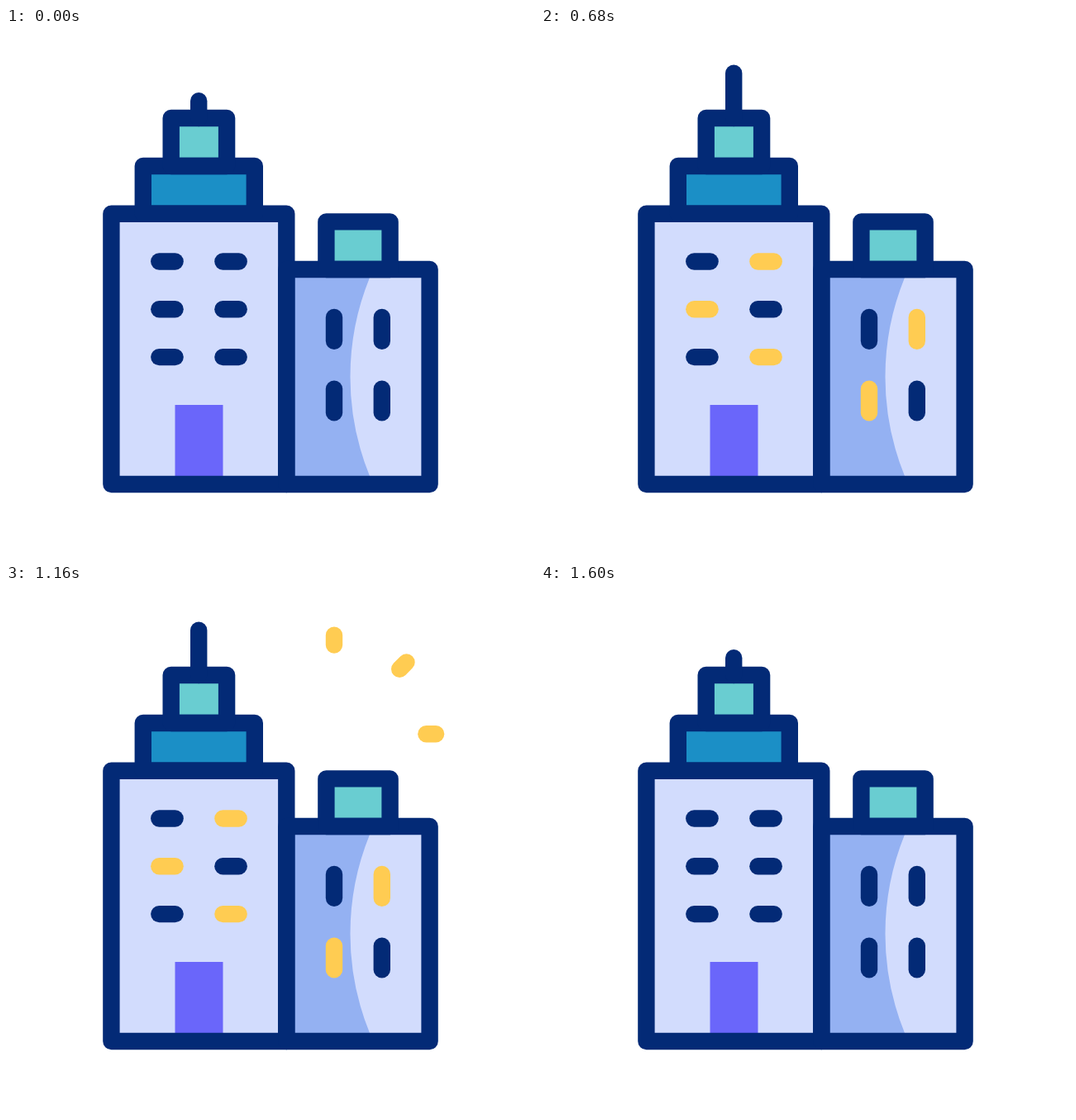
Animation of 640x640 px, one loop 1640 ms. Source, as an HTML page:

```html
<!DOCTYPE html>
<html lang="en">
<head>
<meta charset="utf-8">
<title>City buildings</title>
<style>
  html, body { margin: 0; width: 100%; height: 100%; overflow: hidden; background: #fff; }
  svg { display: block; width: 100%; height: 100%; }
  .line { fill: none; stroke: #032a76; stroke-width: 20.4; stroke-linecap: round; stroke-linejoin: round; }
  .spark { stroke: #ffcc52; }
</style>
</head>
<body>
<svg viewBox="0 0 640 640">
  <rect x="127" y="225" width="212" height="327" fill="#d2dcfd"/>
  <rect x="339" y="292" width="174" height="260" fill="#d2dcfd"/>
  <path d="M339 302H440A318 318 0 0 0 440 542H339Z" fill="#94b1f2"/>
  <rect x="204.5" y="456" width="58" height="90" fill="#6a66fa"/>
  <rect x="387" y="234" width="78" height="58" fill="#69cdd1"/>
  <rect x="200" y="109" width="67" height="58" fill="#69cdd1"/>
  <rect x="166" y="167" width="135" height="58" fill="#1b8fc6"/>
  <g class="line">
    <path d="M127.4 224.8H339.3V552H127.4Z"/>
    <path d="M339.3 292H512.6V552H339.3Z"/>
    <path d="M387.4 292V234.4H464.6V292Z"/>
    <path d="M165.8 224.8V167H300.8V224.8Z"/>
    <path d="M199.7 167V109H267.1V167Z"/>
    <path id="mast"/>
  </g>
  <g id="windows"></g>
  <g id="sparks"></g>
</svg>
<script>
const LOOP = 1640;
const NAVY = '#032a76', YELLOW = '#ffcc52';
const TRAVEL = 333;
const MAST_UP = 338, MAST_DOWN = 1257;
const LIGHTS_ON = 580, LIGHTS_OFF = 1500;
const HEAD_START = 753, TAIL_START = 918;

const byId = id => document.getElementById(id);

function addLine(parent, cls, d = '') {
  const p = document.createElementNS('http://www.w3.org/2000/svg', 'path');
  p.setAttribute('class', cls);
  p.setAttribute('d', d);
  parent.appendChild(p);
  return p;
}

// Windows that light up form a checker pattern.
const lit = [];
function addWindow(row, col, d) {
  const p = addLine(byId('windows'), 'line', d);
  if ((row + col) % 2) lit.push(p);
}
for (let row = 0; row < 3; row++)
  for (let col = 0; col < 2; col++)
    addWindow(row, col, `M${185.3 + col * 77.1} ${282.5 + row * 57.8}h19.3`);
for (let row = 0; row < 2; row++)
  for (let col = 0; col < 2; col++)
    addWindow(row, col, `M${397 + col * 57.8} ${350 + row * 86.6}v28.8`);

// Each spark runs along its own short path: start point, then direction.
const sparks = [
  { x: 397, y: 126, dx: 0, dy: -65.3 },
  { x: 438.3, y: 139.6, dx: 46.2, dy: -46.2 },
  { x: 454.8, y: 180.2, dx: 65.3, dy: 0 }
].map(s => ({ ...s, el: addLine(byId('sparks'), 'line spark') }));

function ease(t, start) {
  const x = Math.min(1, Math.max(0, (t - start) / TRAVEL));
  return x * x * (3 - 2 * x);
}

function draw(t) {
  const lift = ease(t, MAST_UP) - ease(t, MAST_DOWN);
  byId('mast').setAttribute('d', `M233.2 109V${88.3 - 33.6 * lift}`);

  const color = t >= LIGHTS_ON && t < LIGHTS_OFF ? YELLOW : NAVY;
  for (const w of lit) w.style.stroke = color;

  const head = ease(t, HEAD_START), tail = ease(t, TAIL_START);
  for (const s of sparks) {
    const at = k => `${s.x + s.dx * k} ${s.y + s.dy * k}`;
    s.el.setAttribute('d', head > tail ? `M${at(tail)}L${at(head)}` : '');
  }
}

const begin = performance.now();
function tick() {
  draw((performance.now() - begin) % LOOP);
  requestAnimationFrame(tick);
}
draw(0);
requestAnimationFrame(tick);
</script>
</body>
</html>
```
